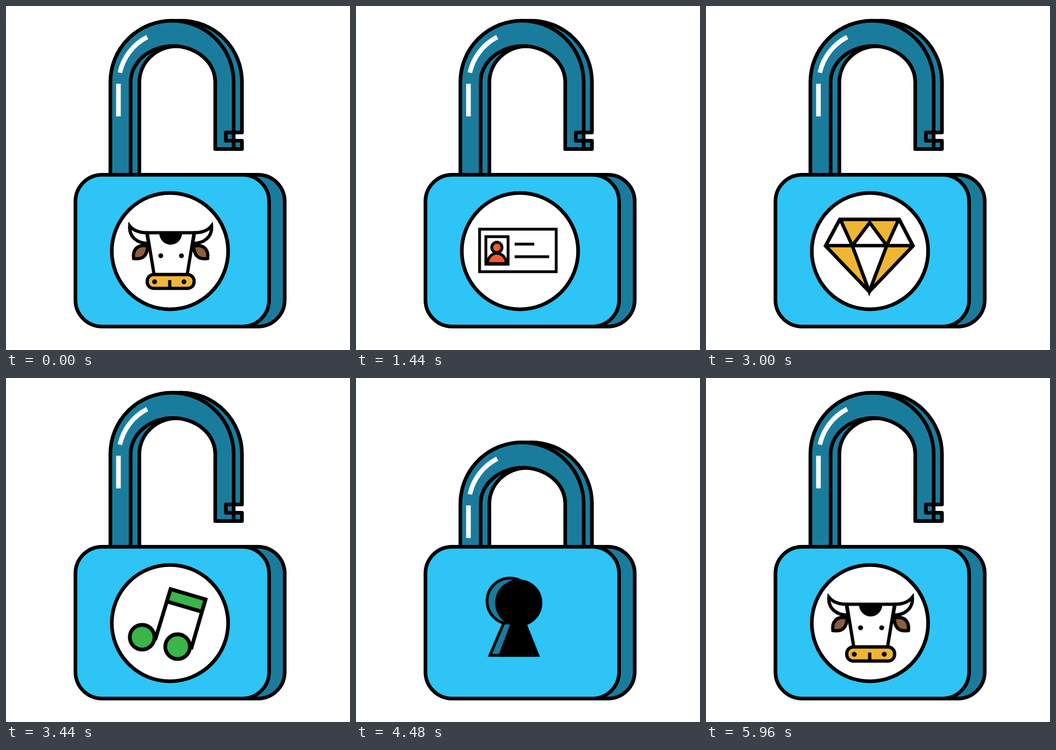
Write an HTML page that moves like this. It is 748x748 px and loops after 6000 ms.

```html
<!DOCTYPE html>
<html lang="en">
<head>
<meta charset="utf-8">
<title>Padlock</title>
<style>
  html, body { margin: 0; width: 100%; height: 100%; overflow: hidden; background: #fff; }
  svg { display: block; width: 100%; height: 100%; }

  :root {
    --rise: cubic-bezier(.333, .667, .667, 1);
    --fall: cubic-bezier(.333, 0, .667, .333);
  }
  .line { stroke: #000; stroke-width: 8; }
  .blue { fill: #2ec4f6; }
  .teal { fill: #1a7c9c; }
  .white { fill: #fff; }
  .gold { fill: #efb634; }
  .orange { fill: #f65b2b; }
  .green { fill: #39b54a; }
  .brown { fill: #8b5e3c; }
  .none { fill: none; }

  .shackle, .disc, .icon { animation: 6s linear infinite; }
  .shackle { animation-name: shackle; }
  .disc { animation-name: disc; transform-origin: 356.5px 533px; }
  .cow { animation-name: cow; transform-origin: 358px 544.5px; }
  .card { animation-name: visit; animation-delay: -4.72s; transform-origin: 352px 531.5px; }
  .gem { animation-name: visit; animation-delay: -3.72s; transform-origin: 355px 543.5px; }
  .note { animation-name: visit; animation-delay: -2.72s; transform-origin: 351.5px 535px; }
  .keyhole { animation-name: keyhole; transform-origin: 344px 518.5px; }

  /* pop in, rest, pop out: one second of the loop */
  @keyframes visit {
    0% { transform: scale(0); animation-timing-function: var(--rise); }
    3.333% { transform: scale(1.04); animation-timing-function: ease-in-out; }
    5.333% { transform: scale(1); }
    12% { transform: scale(1); animation-timing-function: var(--fall); }
    13.333% { transform: scale(1.04); animation-timing-function: var(--fall); }
    16.667%, 100% { transform: scale(0); }
  }
  @keyframes cow {
    0% { transform: scale(1); }
    16.667% { transform: scale(1); animation-timing-function: var(--fall); }
    18% { transform: scale(1.04); animation-timing-function: var(--fall); }
    21.333% { transform: scale(0); }
    96.333% { transform: scale(0); animation-timing-function: var(--rise); }
    99.333%, 100% { transform: scale(1.02); }
  }
  @keyframes keyhole {
    0% { transform: scale(0); }
    71% { transform: scale(0); animation-timing-function: var(--rise); }
    74.333% { transform: scale(1.04); animation-timing-function: ease-in-out; }
    76% { transform: scale(1); }
    92% { transform: scale(1); animation-timing-function: var(--fall); }
    93.333% { transform: scale(1.04); animation-timing-function: var(--fall); }
    96.333%, 100% { transform: scale(0); }
  }
  @keyframes disc {
    0% { transform: scale(1); }
    69.667% { transform: scale(1); animation-timing-function: var(--fall); }
    73.333% { transform: scale(0); }
    94% { transform: scale(0); animation-timing-function: var(--rise); }
    97.667%, 100% { transform: scale(1); }
  }
  @keyframes shackle {
    0% { transform: translateY(0); }
    69.667% { transform: translateY(0); animation-timing-function: ease-in-out; }
    74.667% { transform: translateY(108px); }
    92% { transform: translateY(108px); animation-timing-function: ease-in-out; }
    97%, 100% { transform: translateY(0); }
  }
</style>
</head>
<body>
<svg viewBox="0 0 748 748">
  <g class="shackle line teal" stroke-linejoin="round">
    <path d="M249 400V165A132 133 0 0 1 513 165V275H495V293H513V311H455V165A82.5 77.5 0 0 0 290 165V400Z"/>
    <path d="M227 400V165A134 133 0 0 1 495 165V311H455V165A92 78 0 0 0 271 165V400Z"/>
    <path class="none" d="M495 275H478V293H495"/>
    <path class="none" stroke="#fff" style="stroke:#fff;stroke-width:10" d="M244.5 169V240M247.500 145A115 115 0 0 1 307 67.500"/>
  </g>

  <g class="line">
    <rect class="teal" x="185" y="367" width="421" height="330" rx="58"/>
    <rect class="blue" x="151" y="367" width="421" height="330" rx="58"/>
    <circle class="disc white" cx="356.500" cy="533" r="126.500"/>
  </g>

  <g class="icon cow line" style="stroke-width:7">
    <g id="side">
      <path class="brown" d="M308 522C284 517 275 532 277.500 549C298 552 307 543 308 522Z"/>
      <path class="white" d="M269 478C277 488 288 493 306 493L310 516C286 517 267 502 269 478Z"/>
    </g>
    <use href="#side" transform="translate(716) scale(-1 1)"/>
    <path class="white" d="M307 493H409L394 584H322Z"/>
    <path stroke="none" d="M333 493A25 26 0 0 0 383 493Z"/>
    <rect class="gold" x="307" y="584" width="102" height="30" rx="14"/>
    <path d="M356 596V612"/>
    <g stroke="none">
      <circle cx="336.500" cy="543" r="5.300"/>
      <circle cx="381.500" cy="543" r="5.300"/>
      <circle cx="323" cy="599.500" r="5.300"/>
      <circle cx="387" cy="599.500" r="5.300"/>
    </g>
  </g>

  <g class="icon card line" style="stroke-width:6">
    <rect class="white" x="270" y="486" width="164" height="91"/>
    <rect class="white" x="283.500" y="502" width="47.500" height="59"/>
    <path class="orange" d="M287 559.500A20 22 0 0 1 327 559.500Z"/>
    <circle class="orange" cx="307" cy="525" r="11"/>
    <path d="M345 518H387M345 545H419"/>
  </g>

  <g class="icon gem line" style="stroke-width:7.500">
    <path class="white" d="M291 464H420L450 521.500L355 621L260 521.500Z"/>
    <path class="gold" stroke="none" d="M292 464H356L318 521ZM356 464H419L393 521ZM260 521H318L355 621ZM450 521H393L355 621Z"/>
    <path class="none" d="M292 464L318 521L356 471L393 521L419 464M260 521H450M318 521L355 621L393 521"/>
    <path class="none" d="M291 464H420L450 521.500L355 621L260 521.500Z"/>
  </g>

  <g class="icon note">
    <g class="line" style="stroke-width:7" transform="translate(351.500 535) scale(1.15) translate(-351.500 -535)">
      <path class="none" d="M357 470L328 565M422 489L395 582"/>
      <path class="green" d="M357 470L422 489L415 512L350 493Z"/>
      <circle class="green" cx="304" cy="559.500" r="23"/>
      <circle class="green" cx="370" cy="577" r="23"/>
    </g>
  </g>

  <g class="icon keyhole">
    <g class="line teal" style="stroke-width:6">
      <circle cx="335" cy="486" r="48"/>
      <path d="M322 532L293 600H385L352 532Z"/>
    </g>
    <circle cx="353.500" cy="490" r="49.500"/>
    <path d="M338 528H368L398 603H310Z"/>
  </g>
</svg>
</body>
</html>
```
